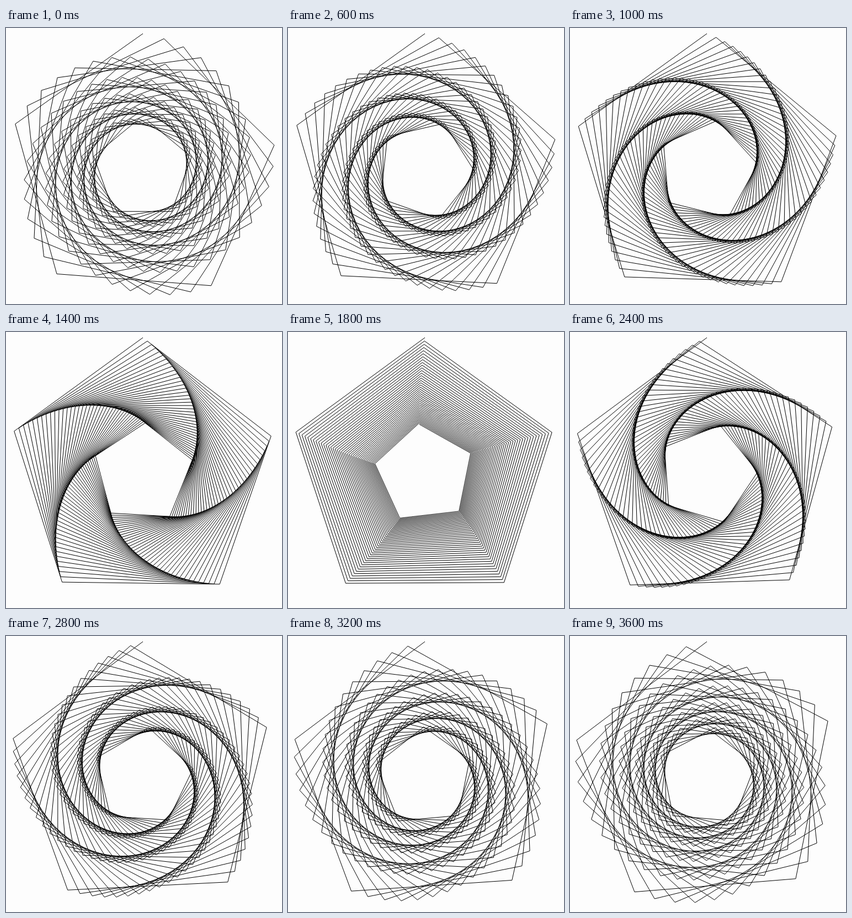
These frames come from a looping animation (500 px wide and 500 px high, 3800 ms). An HTML page:

```html
<!DOCTYPE html>
<html lang="en">
<head>
<meta charset="utf-8">
<title>Pentagon spiral</title>
<style>
  html, body { margin: 0; width: 100%; height: 100%; overflow: hidden; background: #fdfdfd; }
  svg { display: block; width: 100vw; height: 100vh; }
  polyline { fill: none; stroke: #000; stroke-width: 1; stroke-linejoin: miter; }
</style>
</head>
<body>
<svg viewBox="0 0 500 500"><polyline id="spiral"/></svg>
<script>
  const CENTER = { x: 248, y: 257.2 };
  const RADIUS = 247;
  const SHRINK = 0.995;
  const SEGMENTS = 200;
  const STEP_MS = 200;
  const STEPS = 19;
  const TURN = { start: 1.2248, step: 0.0036, end: 1.288 }; // radians per segment

  const spiral = document.getElementById('spiral');
  let shown = -1;

  function spiralPoints(turn) {
    return Array.from({ length: SEGMENTS + 1 }, (_, n) => {
      const r = RADIUS * SHRINK ** n;
      const x = CENTER.x - r * Math.sin(n * turn);
      const y = CENTER.y - r * Math.cos(n * turn);
      return `${x.toFixed(2)},${y.toFixed(2)}`;
    }).join(' ');
  }

  function draw(now) {
    const step = Math.floor(now / STEP_MS) % STEPS;
    if (step !== shown) {
      shown = step;
      const turn = Math.min(TURN.start + TURN.step * step, TURN.end);
      spiral.setAttribute('points', spiralPoints(turn));
    }
  }

  let origin;
  function tick(now) {
    origin ??= now;
    draw(now - origin);
    requestAnimationFrame(tick);
  }
  draw(0);
  requestAnimationFrame(tick);
</script>
</body>
</html>
```
